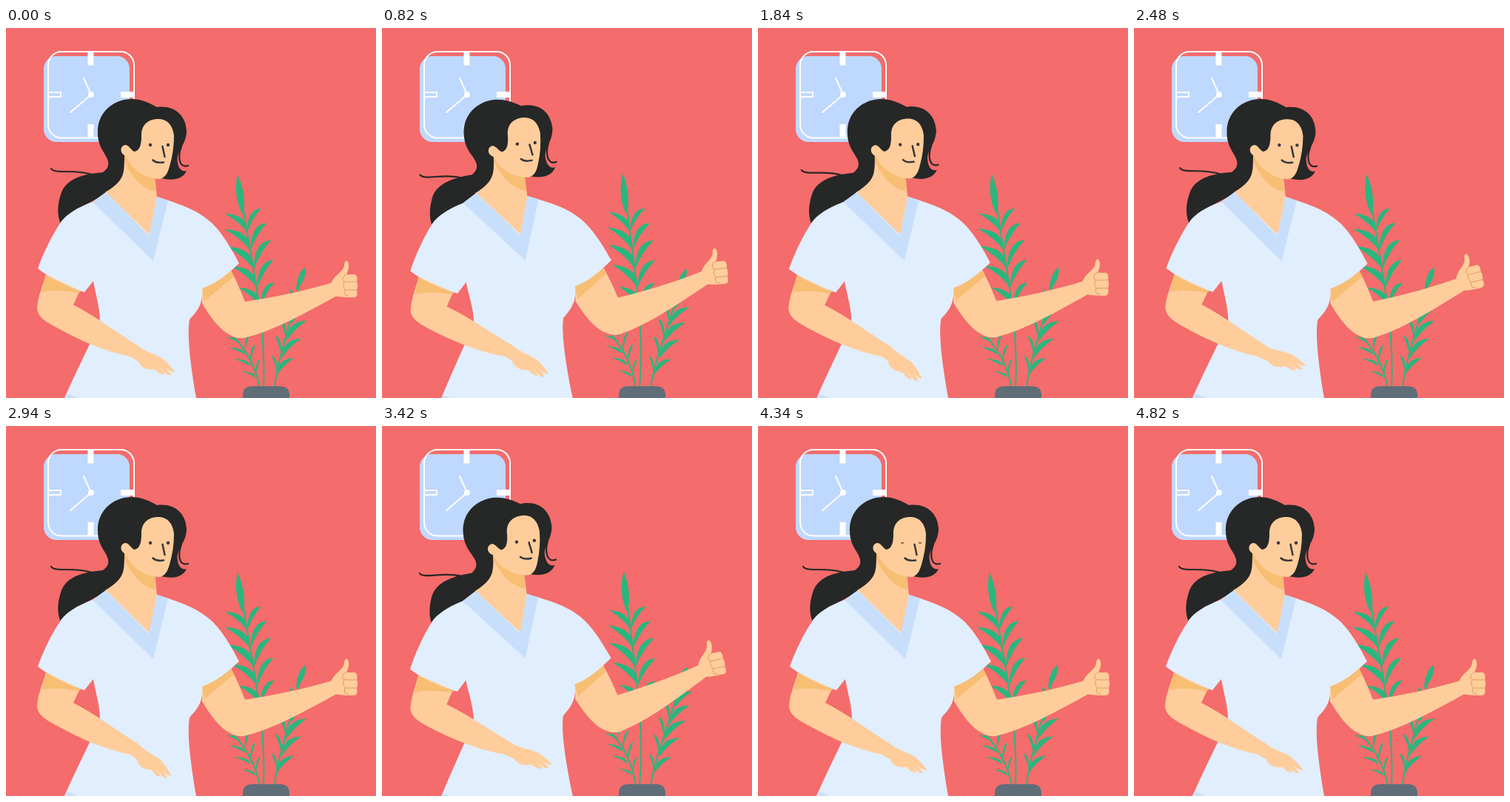
Write an HTML page that moves like this. It is 500x500 px and loops after 4.84 s.

```html
<!DOCTYPE html>
<html lang="en">
<head>
<meta charset="utf-8">
<title>Thumbs up</title>
<style>
  html, body { margin: 0; width: 100%; height: 100%; overflow: hidden; background: #f46c6b; }
  svg { display: block; width: 100%; height: 100%; }
  .skin { fill: #ffcd9b; }
  .shade { fill: #f7be74; }
  .hair { fill: #262727; }
  .line { fill: none; stroke-linecap: round; stroke-linejoin: round; }
</style>
</head>
<body>
<svg viewBox="0 0 500 500">
  <g id="clock" fill="#fff">
    <rect x="51" y="38" width="116" height="116" rx="17" fill="#bfd8fd"/>
    <g class="line" stroke="#fff" stroke-width="2">
      <rect x="57" y="32" width="116" height="116.500" rx="18"/>
      <path d="M57 87H74V93H57M105 68 115 90 87 114"/>
    </g>
    <path d="M110.500 32h8v18.500h-8zM110.500 130h8v18.500h-8zM155 86h18v8h-18z"/>
    <circle cx="115" cy="90" r="4"/>
  </g>

  <g id="plant" fill="#29b67f">
    <path class="line" stroke="#29b67f" stroke-width="2" d="M348 486C352 400 332 320 320 240M343 486C338 460 325 435 308 418M363 486C366 450 385 400 398 340"/>
    <path d="M313 198C308 220 313 240 320 252C325 240 321 215 313 198ZM405 323C396 328 393 342 392 354C400 347 406 336 405 323Z"/>
    <path id="leaves"/>
  </g>
  <path fill="#5f6e79" d="M320 500V495Q321 484 333 484H370Q382 484 383 495V500Z"/>

  <g id="body">
    <g class="head hair">
      <path d="M124 142C123 114 145 96 170 96C184 96 195 102 204 107C226 104 243 116 244 140C243 160 229 166 232 182C233 190 238 195 244 193C238 206 222 207 207 202L180 195L161 190C158 208 140 222 122 231C103 241 86 250 74 265C68 251 70 236 75 222C83 202 108 197 131 195C143 186 138 178 132 168C127 160 124 152 124 142Z"/>
      <path class="line" stroke="#262727" stroke-width="2.200" d="M237 160C232 173 233 190 246 186M61 190C66 198 92 190 116 198"/>
    </g>

    <path class="skin" d="M160 168C160 190 160 198 153 207C148 213 141 218 134 222L194 283L204 229L201 200Z"/>
    <path class="shade" d="M160 172L201 203L202 221C182 217 168 199 160 179Z"/>

    <path class="skin" d="M303 326C312 342 317 355 323 370L325 418C300 422 283 402 265 372V350Z"/>
    <path class="shade" d="M304 327L308 336C295 346 282 358 268 369L265 351Z"/>
    <g id="forearm" class="skin">
      <path d="M322 370C362 364 405 355 441 344L447 362C405 385 360 410 325 418C314 421 306 418 299 411L305 365Z"/>
      <g id="thumb">
        <path d="M439 347C442 334 455 331 457 321C457 316 460 313 462 316C465 322 462 329 460 333L471 333C475 334 475 340 474 343C476 347 475 352 474 354C475 359 475 363 471 364C460 364 452 364 445 362Z"/>
        <path class="line" stroke="#dda05f" d="M460 333C454 335 453 341 458 343H473M457 343C455 347 456 352 459 354H474M458 354C456 359 458 362 463 362"/>
      </g>
    </g>

    <path fill="#e1eefd" d="M117 235C95 243 82 252 75 261C62 280 50 305 43 325C62 340 85 350 106 357L118 342C121 360 127 378 127 396C120 415 99 455 79 500V510H258L257 500C250 460 244 415 248 394C256 385 267 375 265 352C285 345 300 332 315 318C304 297 288 269 270 257C255 245 235 238 204 228L194 280L135 222Z"/>
    <path fill="#c8dffc" d="M135 222L117 235L199 315L219 233L204 228L193 281ZM82 494L98 500V508H78Z"/>

    <g class="skin">
      <path d="M54 333C50 348 43 362 42 378C42 389 52 396 65 403C95 420 132 437 172 445L181 431C150 412 122 390 91 374L100 355Z"/>
      <path class="shade" d="M54 333L48 357C62 353 82 355 97 358L102 356C85 350 68 343 54 333Z"/>
      <path id="rest" d="M166 430L180 431C190 438 205 442 212 447C218 452 224 459 228 464C226 467 221 463 216 459C219 463 222 466 223 469C218 471 213 464 207 459C210 463 214 466 214 468C210 470 204 464 200 461C192 462 184 461 178 450L168 444Z"/>
    </g>

    <g class="head">
      <path class="skin" d="M183 145C183 130 193 123 206 123C219 123 226 133 227 146C227 160 225 174 221 187C218 198 214 203 207 204C189 203 170 193 162 173C154 170 153 160 161 158C166 158 168 164 173 167C182 166 183 155 183 145Z"/>
      <g id="eyes" fill="#35383c"><circle cx="195" cy="158" r="2.200"/><circle cx="219" cy="158" r="2.200"/></g>
      <path class="line" stroke="#35383c" stroke-width="2.500" d="M211.500 160L214.500 174M198.500 178.500Q203 183 213 181.500"/>
    </g>
  </g>
</svg>
<script>
const LOOP = 4840, FIRST = 920, GAP = 1220, BLINK = 4340;
const $ = id => document.getElementById(id);
const heads = document.querySelectorAll('.head');

// A curved leaf growing from a point on the stem
const leaf = (x, y, dx, dy) =>
  `M${x} ${y}q0 ${dy * 0.97} ${dx} ${dy}q${-dx * 0.62} ${-dy * 0.4} ${-dx} ${-dy}Z`;

// Pairs of leaves down a stem, largest in the middle
function branch(count, [x, y], [stepX, stepY], left, right) {
  let path = '';
  for (let i = 0; i < count; i++) {
    const size = 0.8 + 0.3 * Math.sin(Math.PI * (i + 0.5) / count);
    for (const [dx, dy] of [left, right])
      path += leaf(x + i * stepX, y + i * stepY, dx * size, dy * size);
  }
  return path;
}
$('leaves').setAttribute('d',
  branch(5, [326, 276], [4.5, 25], [-34, -28], [21, -36]) +
  branch(4, [315, 426], [7.3, 15.5], [-20, -9], [7, -27]) +
  branch(5, [391, 378], [-6, 22.5], [-9, -28], [25, -25]));

const bump = (t, center, width) => {
  const k = Math.max(0, 1 - Math.abs(t - center) / width);
  return k * k * (3 - 2 * k);
};
const sway = (t, lag = 0, width = 420) =>
  [0, 1, 2].reduce((sum, i) => sum + bump(t, FIRST + i * GAP + lag, width), 0);
const turn = (el, deg, x, y) => el.setAttribute('transform', `rotate(${deg.toFixed(3)} ${x} ${y})`);

function draw(now) {
  const t = now % LOOP;
  const lean = sway(t) - 0.2 * sway(t, 400);
  turn($('plant'), 2.9 * sway(t), 350, 485);
  turn($('body'), -1.9 * lean, 166, 494);
  heads.forEach(h => turn(h, -3 * lean, 180, 215));
  turn($('forearm'), -6.5 * sway(t, 115, 450), 312, 395);
  turn($('thumb'), -11 * sway(t, 300, 450), 442, 354);
  turn($('rest'), 11 * (sway(t, -300) - sway(t, 240)), 176, 437);
  const open = 1 - 0.65 * bump(t, BLINK, 110);
  $('eyes').setAttribute('transform', `translate(0 ${158 * (1 - open)}) scale(1 ${open})`);
  requestAnimationFrame(() => draw(performance.now() - start));
}
const start = performance.now();
draw(0);
</script>
</body>
</html>
```
